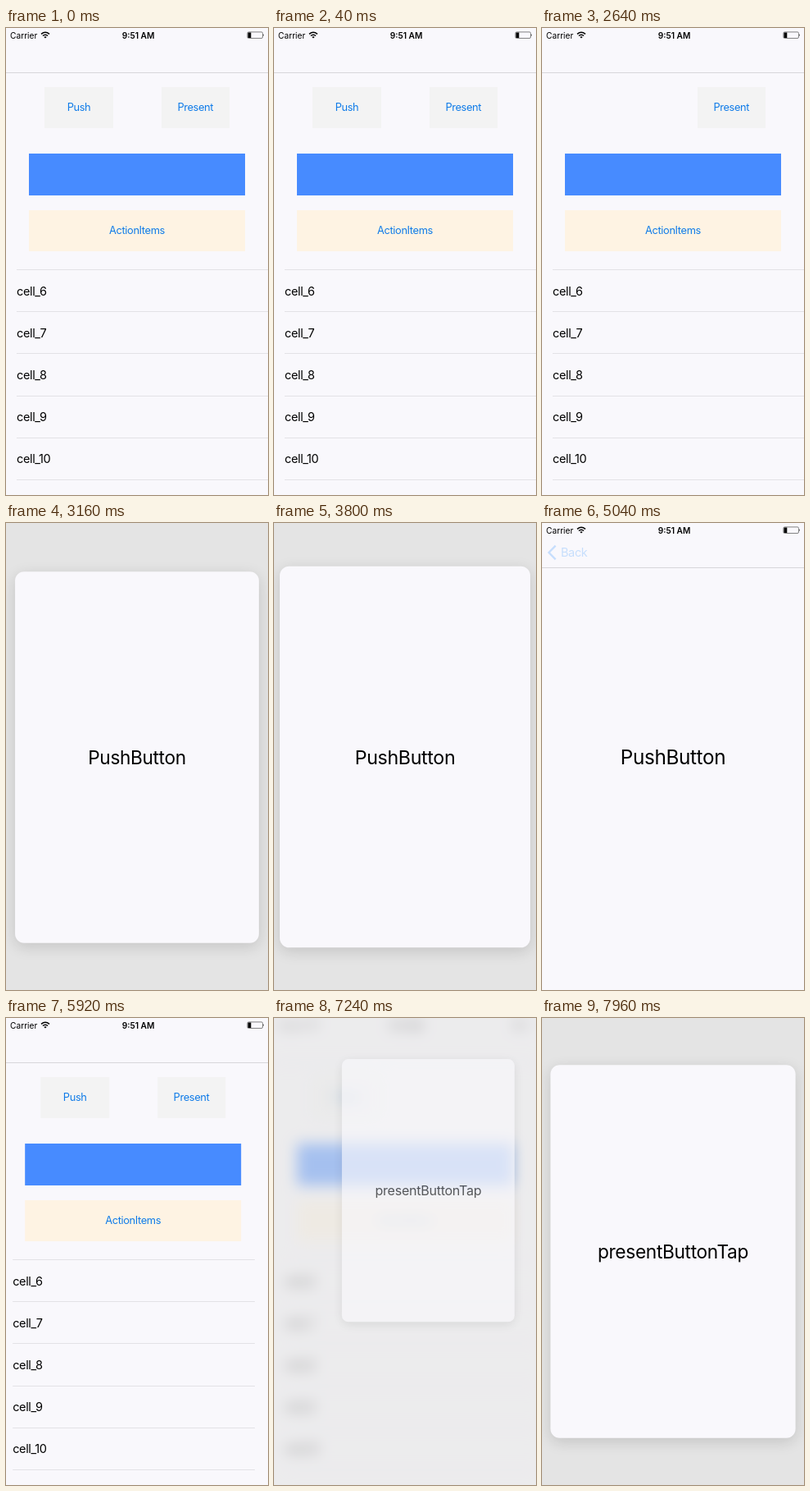
An HTML page for the animation above (8000 ms loop, 320x569 px).

```html
<!DOCTYPE html>
<html lang="en">
<head>
<meta charset="utf-8">
<title>Peek and pop</title>
<style>
  html, body { margin: 0; width: 100%; height: 100%; overflow: hidden; background: #f9f8fc; }
  body { position: relative; font: 14.5px/20px Inter, "Liberation Sans", sans-serif; letter-spacing: -.025em; color: #000; }
  body div, body svg, body span { position: absolute; box-sizing: border-box; white-space: nowrap; }
  .layer { left: 0; top: 0; width: 320px; height: 569px; }
  #stage { overflow: hidden; background: #f9f8fc; }
  #page { background: #f9f8fc; }
  .button { height: 50px; line-height: 50px; font-size: 12.8px; text-align: center; color: #0f7be8; background: #f3f3f3; }
  .line { height: 1px; background: #e3e2e6; }
  .cell { left: 13px; }
  .title { left: 0; width: 100%; top: 50%; margin-top: -20px; line-height: 40px; font-size: 24.3px; text-align: center; }
  .status { top: 0; line-height: 18px; font-size: 10.2px; letter-spacing: 0; }
  #back { color: #007aff; left: 0; top: 0; width: 80px; height: 54px; }
  #dim { background: #e4e4e4; }
  #card { left: 0; top: 0; width: 320px; background: #f9f8fc; box-shadow: 0 5px 19px rgba(0, 0, 0, .14); }
</style>
</head>
<body>
<div id="stage" class="layer">
  <div id="view" class="layer">
    <div id="main" class="layer">
      <div id="push" class="button" style="left:47px;top:72px;width:84px">Push</div>
      <div id="present" class="button" style="left:189.5px;top:72px;width:83.5px">Present</div>
      <div style="left:28px;top:153px;width:264px;height:51px;background:#478bff"></div>
      <div class="button" style="left:28px;top:222px;width:264px;background:#fef3e3">ActionItems</div>
    </div>
    <div id="page" class="layer"><div class="title" id="pageTitle">PushButton</div></div>
    <div id="bar" class="layer">
      <span class="status" style="left:5px">Carrier</span>
      <svg style="left:42px;top:3px" width="12" height="11" fill="none" stroke="#000" stroke-width="1.5">
        <path d="M1 4.4Q6 .2 11 4.4M2.9 6.5Q6 3.9 9.1 6.5"/><path d="M6 9.6L4.3 7.9Q6 6.8 7.7 7.9Z" fill="#000" stroke="none"/>
      </svg>
      <span class="status" style="left:0;width:323px;text-align:center;font-weight:600">9:51 AM</span>
      <svg style="left:294px;top:4px" width="23" height="10">
        <rect x=".9" y=".9" width="18.6" height="7.6" rx="1.5" fill="none" stroke="#777" stroke-width=".9"/>
        <path d="M1.5 1.5h3.8v6.4H1.5zM20.3 3.3q1.5 1.4 0 2.8z"/>
      </svg>
      <div class="line" style="left:0;top:54px;width:320px;background:#d8d7db"></div>
      <div id="back">
        <svg style="left:6px;top:26px" width="12" height="20" fill="none" stroke="#007aff" stroke-width="2.4"><path d="M10.6 1.6L2.4 10L10.6 18.4"/></svg>
        <span style="left:23px;top:26px">Back</span>
      </div>
    </div>
  </div>
  <div id="dim" class="layer"></div>
  <div id="card"><div class="title" id="cardTitle"></div></div>
</div>
<script>
const LOOP = 8000, CARD_HEIGHT = 486, PEEK_SCALE = .931;
const $ = id => document.getElementById(id);
const ramp = (t, from, to) => Math.min(1, Math.max(0, (t - from) / (to - from)));
const mix = (a, b, p) => a + (b - a) * p;
const show = (id, on) => { $(id).style.visibility = on ? 'visible' : 'hidden'; };
const fade = (id, alpha) => { $(id).style.opacity = alpha; };

for (let i = 0; i < 6; i++) {
  const y = 294 + i * 51.2;
  const cell = i < 5 ? `<div class="cell" style="top:${y + 16.5}px">cell_${i + 6}</div>` : '';
  $('main').insertAdjacentHTML('beforeend',
    `<div class="line" style="left:13px;top:${Math.round(y)}px;width:307px"></div>${cell}`);
}

const peeks = [
  { title: 'PushButton', x: 89, start: 2810, open: 3210, press: 3500, pressed: 3920, scale: .966, y: 284.8, end: 4200 },
  { title: 'presentButtonTap', x: 231, start: 7200, open: 7400, press: 7540, pressed: 7960, scale: .935, y: 284.5, end: LOOP }
];

// Zoom after committing the preview: one overshoot, then rest.
function popScale(t) {
  const s = Math.max(0, t - 4060) / 1000;
  return 1 + Math.exp(-10 * s) * (1.37 * s - .034);
}

function drawPeek(t) {
  const peek = peeks.find(p => t >= p.start && t < p.end);
  show('dim', peek);
  show('card', peek);
  $('view').style.filter = 'none';
  if (!peek) return;

  const raw = ramp(t, peek.start, peek.open);
  const open = 1 - (1 - raw) ** 4;
  const force = ramp(t, peek.press, peek.pressed);
  const commit = ramp(t, 4060, 4200) * (peek === peeks[0]);
  const scale = commit ? popScale(t) : mix(mix(.25, PEEK_SCALE, open), peek.scale, force);
  const x = mix(peek.x, 160, open);
  const y = mix(mix(97, 285.5, open), peek.y, force);

  $('view').style.filter = `blur(${14 * open}px)`;
  fade('dim', open);
  fade('card', Math.min(1, raw * 3));
  fade('cardTitle', 1 - commit);
  $('cardTitle').textContent = peek.title;
  const card = $('card').style;
  card.height = mix(CARD_HEIGHT, 569, commit) + 'px';
  card.borderRadius = 12 * (1 - commit) + 'px';
  card.transform = `translate(${x}px,${y}px) translate(-50%,-50%) scale(${scale})`;
}

function draw(t) {
  const onPage = t >= 4200 && t < 6300;
  const s = Math.max(0, t - 5580) / 1000 * 13.9;
  const slide = 1 - (1 + s) * Math.exp(-s);
  const appear = onPage ? ramp(t, 4155, 4375) : 1;

  show('push', t < 2640 || t >= 5560);
  show('present', t < 7000);
  show('page', onPage);
  show('pageTitle', onPage);
  show('back', onPage);
  fade('pageTitle', appear);
  fade('bar', appear);
  fade('back', mix(1, .2, ramp(t, 4890, 5040)) * (1 - ramp(t, 5580, 5800)));
  $('main').style.transform = onPage ? `translateX(${-96 * (1 - slide)}px)` : 'none';
  $('page').style.transform = `translateX(${320 * slide}px)`;
  $('view').style.transform = onPage && t < 4900 ? `scale(${popScale(t)})` : 'none';
  drawPeek(t);
}

const began = performance.now();
function tick() {
  draw((performance.now() - began) % LOOP);
  requestAnimationFrame(tick);
}
tick();
</script>
</body>
</html>
```
